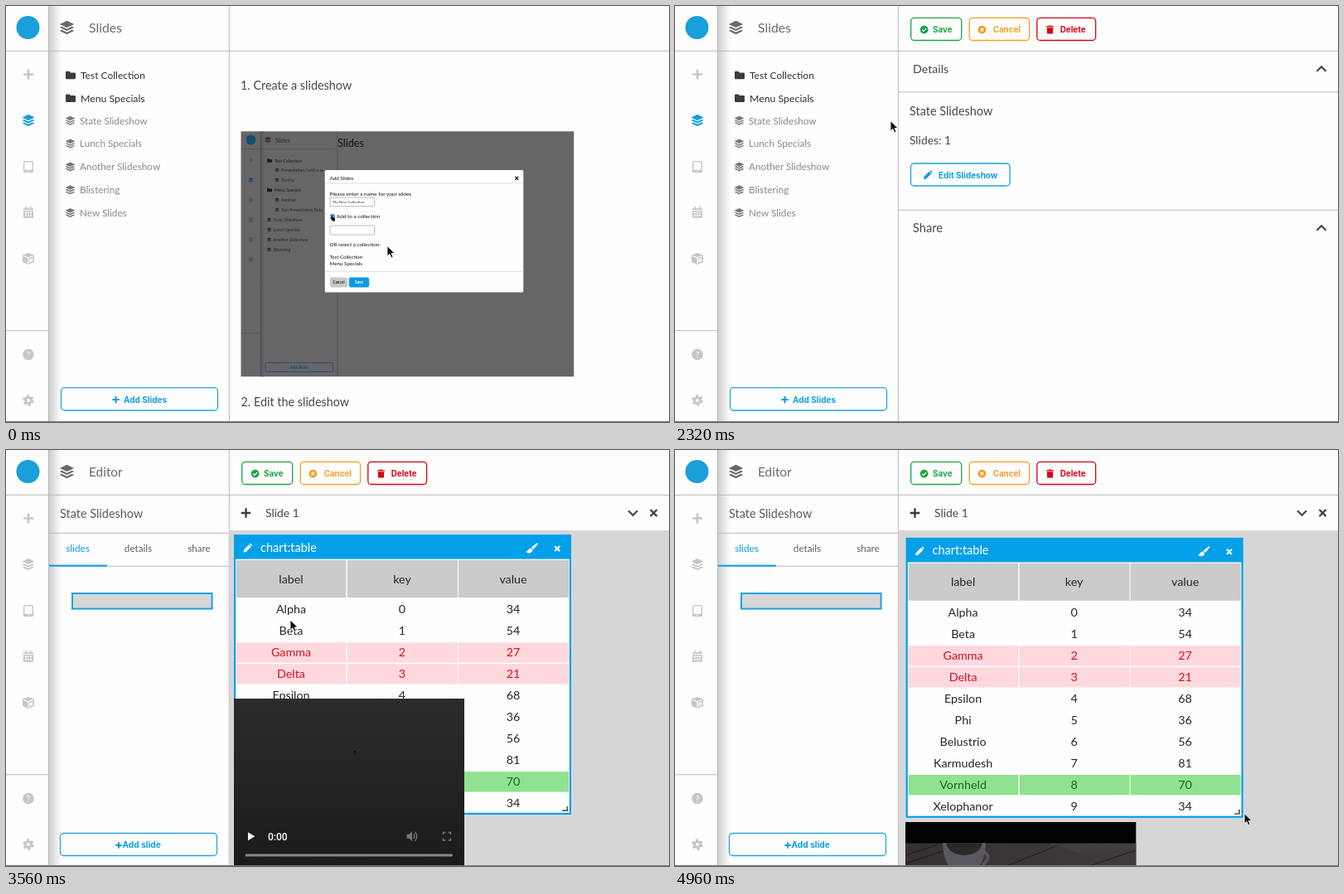
These frames come from a looping animation (800 px wide and 502 px high, 5 s). An HTML page:

```html
<!DOCTYPE html>
<html lang="en">
<head>
<meta charset="utf-8">
<title>Slideshow editor</title>
<style>
html, body { margin: 0; width: 100%; height: 100%; overflow: hidden; background: #fefefe; }
svg { display: block; width: 800px; height: 502px; }
text { font-family: Lato, sans-serif; white-space: pre; }
.b { font-family: Inter, sans-serif; font-weight: 700; }
.hide { display: none; }
.row rect { fill: none; }
.row { color: #888; --icon: #777; }
.row.on { color: #2ba6de; --icon: #2ba6de; }
.row.on rect { fill: #eae9ef; }
#edit { color: #0c9fe3; --bg: #fefefe; }
#edit.on { color: #fff; --bg: #03a0ea; }
</style>
</head>
<body>
<svg id="stage" viewBox="0 0 800 502" xmlns="http://www.w3.org/2000/svg"></svg>
<script>
const LOOP = 5000, BLUE = '#03a0ea', LINE = '#b9b9bd', INK = '#48484a';
const OPEN_DETAILS = 1360, OPEN_EDITOR = 3520, LAYOUT_DONE = 3760;

// Drawing helpers, all return SVG markup.
const text = (x, y, s, size, fill = INK, extra = '') =>
  `<text x="${x}" y="${y}" font-size="${size}" fill="${fill}" ${extra}>${s}</text>`;
const mid = (x, y, s, size, fill) => text(x, y, s, size, fill, 'text-anchor="middle"');
const bold = (x, y, s, size, fill) => text(x, y, s, size, fill, 'class="b"');
const rect = (x, y, w, h, fill, extra = '') =>
  `<rect x="${x}" y="${y}" width="${w}" height="${h}" fill="${fill}" ${extra}/>`;
const path = (d, fill, extra = '') => `<path d="${d}" fill="${fill}" ${extra}/>`;
const stroke = (d, color, w, extra = '') =>
  path(d, 'none', `stroke="${color}" stroke-width="${w}" ${extra}`);
const at = (x, y, body, k = 1) => `<g transform="translate(${x} ${y}) scale(${k})">${body}</g>`;
const group = (id, body) => `<g id="${id}">${body}</g>`;
const frame = (x, y, w, h, color, fill = '#fefefe') =>
  rect(x, y, w, h, fill, `rx="4" stroke="${color}" stroke-width="1.3"`);

// Icons, centred on the given point.
const layers = (x, y, fill, k = 1) => at(x, y, path(
  'M0-8 8.5-4 0 0-8.5-4ZM-8.5 0-6-1.2 0 1.6 6-1.2 8.5 0 0 4ZM-8.5 4-6 2.8 0 5.6 6 2.8 8.5 4 0 8Z', fill), k);
const folder = (x, y, fill, k = 1) => at(x, y, path(
  'M-6-3.5Q-6-4.7-4.8-4.7H-1.6L0-3.1H4.8Q6-3.1 6-2V3.5Q6 4.7 4.8 4.7H-4.8Q-6 4.7-6 3.5Z', fill), k);
const plus = (x, y, r, color, w) => stroke(`M${x - r} ${y}h${2 * r}M${x} ${y - r}v${2 * r}`, color, w);
const cross = (x, y, r, color, w) =>
  stroke(`M${x - r} ${y - r}l${2 * r} ${2 * r}M${x + r} ${y - r}l${-2 * r} ${2 * r}`, color, w);
const chevron = (x, y, h) =>
  stroke(`M${x - 5.5} ${y + h}L${x} ${y - h}L${x + 5.5} ${y + h}`, INK, 2.2);
const pencil = (x, y, fill) => at(x, y, path(
  'M-5 5-4.4 1.8 1.6-4.2 4.2-1.6-1.8 4.4ZM2.3-4.8 3.2-5.5Q4-5.6 5-4.6 5.6-3.8 5.3-3.2L4.8-2.3Z', fill));
const tablet = (x, y, c, k = 1) => at(x, y,
  rect(-6, -7, 12, 14, c, 'rx="1.5"') + rect(-4.6, -5.6, 9.2, 9.4, '#fefefe') + rect(-.8, 4.8, 1.6, 1.2, '#fefefe'), k);
const calendar = (x, y, c, k = 1) => {
  let cells = '';
  for (let i = 0; i < 6; i++) cells += rect(-4.2 + i % 3 * 3.1, -.6 + (i / 3 | 0) * 3.3, 2.1, 2.1, '#fefefe');
  return at(x, y, path('M-6-4.8H-3.6V-7H-2V-4.8H2V-7H3.6V-4.8H6V-2.9H-6ZM-6-2H6V6.8H-6Z', c) + cells, k);
};
const cube = (x, y, c, k = 1) => at(x, y,
  path('M0-7 7-4.4V3.8L0 7-7 3.8V-4.4Z', c) +
  stroke('M-5.6-3.4 0-1.3 5.6-3.4M0-1.3V6', '#fefefe', 1.2) + path('M1.4 .6 5.4-1V2.8L1.4 4.6Z', '#fefefe'), k);
const gear = (x, y, c, k = 1) => at(x, y,
  `<circle r="5.4" fill="none" stroke="${c}" stroke-width="2.6" stroke-dasharray="3.1 2.555"/>` +
  `<circle r="3.4" fill="none" stroke="${c}" stroke-width="2.8"/>`, k);
const disc = (x, y, r, fill) => `<circle cx="${x}" cy="${y}" r="${r}" fill="${fill}"/>`;

function rail() {
  const c = '#c6c6c8';
  return rect(52, 0, 15, 502, 'url(#edge)') + disc(26.5, 26, 14, '#199fd9') +
    stroke('M0 54.3H800M0 391.8H51M51.5 0V502M269.3 0V502', LINE, 1) +
    plus(27, 82.5, 6, c, 2.6) + layers(27, 138, c, .86) +
    group('active', layers(27, 138, '#0c9fe3', .86)) +
    tablet(27, 194, c) + calendar(27, 249, c) + cube(27, 305, c) +
    disc(27, 420.5, 6.8, c) + mid(27, 424.5, '?', 11, '#fefefe') + gear(27, 476, c) +
    layers(73.5, 26, '#69696c', 1.02);
}

const slides = ['State Slideshow', 'Lunch Specials', 'Another Slideshow', 'Blistering', 'New Slides'];

function sidebar() {
  const row = (s, i) => {
    const y = 138.3 + i * 27.8;
    return `<g class="row">${rect(65, y - 13.8, 190, 27.4, '', 'rx="5"')}` +
      layers(77.5, y, 'var(--icon)', .69) + text(89, y + 4.3, s, 11.75, 'currentColor') + '</g>';
  };
  return text(100, 32.3, 'Slides', 15.8, '#6a6a6d') +
    folder(78, 83.5, '#3c3c3e') + text(90, 87.8, 'Test Collection', 12, '#303032') +
    folder(78, 111.2, '#3c3c3e') + text(90, 115.5, 'Menu Specials', 12.3, '#303032') +
    slides.map(row).join('') +
    frame(66.5, 460.7, 189, 27.3, '#25a6dd') + plus(132.5, 475, 4.2, '#0c9fe3', 2) +
    bold(142, 478.7, 'Add Slides', 10, '#0c9fe3');
}

// Small recording shown on the welcome page.
function tutorial() {
  const d = '#2b292b', f = '#1d1b1d';
  const items = [
    [187, 'Test Collection', 0], [198, 'Presentation I with a re', 1], [210, 'Testing', 1],
    [222.5, 'Menu Specials', 0], [234, 'Another', 1], [246, 'Test Presentation Beta', 1],
    [258, 'State Slideshow', 2], [270, 'Lunch Specials', 2], [282, 'Another Slideshow', 2], [294, 'Blistering', 2]
  ];
  const list = items.map(([y, s, kind]) => {
    const x = [324, 332, 322.5][kind];
    return (kind ? layers(x - 5, y, d, .32) : folder(x - 6, y - .5, f, .5)) +
      text(x, y + 1.8, s, 5.05, kind ? d : f);
  }).join('');
  const dim = '#565356';
  return rect(283.5, 151.3, 401.7, 295.9, '#686568') + rect(307, 151.3, 5, 295.9, 'url(#edge2)') +
    stroke('M283.5 172.5H400M307 151.3V447M399.8 151.3V447M283.5 395H307', '#4b494b', .6) +
    disc(295.5, 161.5, 6, '#14506b') + layers(316, 161.5, d, .45) + text(325, 164.5, 'Slides', 7, d) +
    plus(295.5, 186, 2.4, dim, 1.1) + layers(295.5, 210, '#114f6d', .38) +
    [234, 258, 282].map(y => rect(293, y - 2.8, 5, 5.6, dim, 'rx="1"')).join('') + disc(295.5, 306, 2.8, dim) +
    list + rect(313, 430.5, 81.5, 11, 'none', 'rx="2" stroke="#164f69" stroke-width=".8"') +
    bold(339, 437.8, '+ Add Slides', 4.2, '#164f69') + text(400, 170.3, 'Slides', 12.6, '#111') +
    rect(384.7, 198, 239.6, 147.5, '#fefefe', 'rx="1.5"') +
    text(390.5, 210, 'Add Slides', 6.3, '#111') + cross(616.3, 207.8, 1.9, '#111', 1.3) +
    stroke('M385 213.8H624M385 320.3H624', '#d5d5d8', .7) +
    text(390.5, 228.6, 'Please enter a name for your slides', 6.5, '#151515') +
    rect(391, 231, 53.5, 10.7, '#fefefe', 'stroke="#aaa" stroke-width=".8" rx="1"') +
    text(394, 238, 'My New Collection', 4.6, '#444') +
    rect(391.4, 251.2, 5.2, 5.2, '#1384d0', 'rx="1"') + stroke('M392.6 253.8l1.2 1.2 1.9-2.4', '#fff', .8) +
    text(399, 255.8, 'Add to a collection', 6.35, '#151515') +
    rect(391, 265, 53.5, 11, '#fefefe', 'stroke="#aaa" stroke-width=".8" rx="1"') +
    group('focus', rect(391, 265, 53.8, 11.2, '#fefefe', 'stroke="#259fdb" stroke-width="1.5" rx="1"') +
      stroke('M394 267.5v6', '#333', .5)) +
    text(390.5, 290.4, 'OR select a collection:', 6.3, '#151515') +
    text(390.5, 305.4, 'Test Collection', 6.1, '#151515') + text(390.5, 312.8, 'Menu Specials', 6.25, '#151515') +
    rect(391, 327.5, 21.5, 12, '#c9c9c9', 'rx="2.5"') + bold(394.3, 335.2, 'Cancel', 4.2, '#333') +
    rect(413.8, 327.5, 24.4, 12, '#0b9be2', 'rx="2.5"') + bold(421, 335.2, 'Save', 4.2, '#fff') +
    group('mini', '<g id="miniHand">' + path('M-1-3V0L-2.2-.8-2.6 0 0 3.6H3V0L.2-1V-3Z', '#111') + '</g>' +
      '<g id="miniBeam"><circle r="6" fill="#fff" fill-opacity=".7" stroke="#222" stroke-width="1.1"/>' +
      stroke('M-1.2-3.2Q0-3.2 0-2.4V2.4Q0 3.2-1.2 3.2M1.2-3.2Q0-3.2 0-2.4M0 2.4Q0 3.2 1.2 3.2', '#222', .8) + '</g>');
}

const welcome = () => text(283, 101, '1. Create a slideshow', 14.4) + tutorial() +
  text(283.5, 483, '2. Edit the slideshow', 14.4);

function toolbar() {
  const g = '#1fa446', o = '#f0a024', r = '#d8000f';
  return frame(284.7, 14.3, 61, 27.2, g) + disc(300.6, 28.6, 4.9, g) +
    stroke('M298.2 28.7l1.7 1.7 3.2-3.3', '#fefefe', 1.3) + bold(311, 32.3, 'Save', 9.9, g) +
    frame(355.2, 14.3, 72.4, 27.2, o) + disc(370.4, 28.6, 4.9, o) +
    cross(370.4, 28.6, 1.8, '#fefefe', 1.3) + bold(383.7, 32.3, 'Cancel', 9.8, o) +
    frame(436.8, 14.3, 70.8, 27.2, r) +
    path('M448 24.2H450.8L451.3 23.4H453.7L454.2 24.2H457V25.5H448ZM448.7 26.2H456.3L455.9 33.6H449.1Z', r) +
    bold(464.8, 32.3, 'Delete', 9.8, r);
}

const details = () => text(287, 81, 'Details', 14.2) + chevron(780, 76, 2.8) +
  stroke('M270 103.9H800M270 246.2H800', LINE, 1) +
  text(283, 132, 'State Slideshow', 14.45) + text(283, 166.7, 'Slides: 1', 13.8) +
  group('edit', frame(284.5, 190, 119.6, 27, '#1ba3e0', 'var(--bg)') +
    pencil(305, 204, 'currentColor') + bold(318, 207.7, 'Edit Slideshow', 9.95, 'currentColor')) +
  text(287, 273, 'Share', 14.6) + chevron(780, 268, 2.8);

function table() {
  const rows = [['Alpha', 34], ['Beta', 54], ['Gamma', 27], ['Delta', 21], ['Epsilon', 68], ['Phi', 36],
    ['Belustrio', 56], ['Karmudesh', 81], ['Vornheld', 70], ['Xelophanor', 34]];
  const cols = [[278, 344], [412, 478], [546, 612]];
  const line = (cells, y, top, h, bg, ink) => cols.map(([x, c], i) =>
    (bg ? rect(x, top, i ? 133 : 132.5, h, bg) : '') + mid(c, y, cells[i], 14.3, ink)).join('');
  const body = rows.map(([name, v], i) => {
    const y = 192.2 + 26 * i, low = v < 30, high = v === 70;
    return line([name, i, v], y + 5, y - 12, 24.4, low ? '#ffd8de' : high ? '#90e290' : '',
      low ? '#d3101c' : high ? '#15691c' : '#262628');
  }).join('');
  const brush = path('M7-6.2Q7.6-5.6 6.8-4.6L1.8 1.2-.8-1 5.6-6.2Q6.4-6.8 7-6.2ZM-1.4-.4 1 1.8Q.6 5.4-3.4 5.6-6 5.6-7 3.6-5 3.8-4.4 2-3.6-.2-1.4-.4Z', '#fff');
  return rect(275, 102, 407, 338, BLUE) + rect(277.2, 131.6, 402.6, 306.2, '#fefefe') +
    pencil(291.5, 118.5, '#fff') + text(307, 122.6, 'chart:table', 14.5, '#fff') +
    at(634.5, 118.8, brush) + cross(665.2, 119, 3, '#fff', 2.1) +
    line(['label', 'key', 'value'], 160.5, 133, 45, '#cbcbcb', '#262628') + body +
    stroke('M671.5 435.2H677.3V430', '#555', 1.7);
}

const loadingVideo = () => rect(275, 300, 278, 202, 'url(#player)') + rect(420, 363, 1.8, 2.4, '#0d0d0e') +
  path('M292 461.2 300.3 466.2 292 471.2Z', '#fff') +
  text(316, 470.5, '0:00', 12, '#fff', 'style="font-family:Roboto,sans-serif;font-weight:500"') +
  path('M483.5 463.7H486.5L490 460.2V472.2L486.5 468.7H483.5Z', '#757477') +
  stroke('M492 463.3Q494 466.2 492 469.1M493.6 460.7Q498 466.2 493.6 471.7', '#757477', 1.4) +
  stroke('M527.5 464V461.5H530.5M533.5 461.5H536.5V464M536.5 468.5V471H533.5M530.5 471H527.5V468.5', '#757477', 1.5) +
  rect(288.5, 487.6, 250.5, 3, '#89888a', 'rx="1.5"');

const photo = () => '<g clip-path="url(#photoBox)">' + rect(278, 449, 278.5, 53, '#020202') +
  rect(278, 474.5, 278.5, 28, 'url(#wood)') +
  stroke('M278 489 318 476M278 499 330 482M400 502 470 474M500 502 556 483', '#231f20', 1.2) +
  path('M452 475H556V481L490 487Z', '#4a4244', 'opacity=".5"') +
  stroke('M372 485Q384 490 371 501', '#55545b', 4) +
  path('M323 474H375Q375 492 366 504H332Q323 492 323 474Z', '#5a5960') +
  path('M327 474H371Q368 488 349 489 330 488 327 474Z', '#2c2829') + '</g>';

const editor = () => text(100, 32.3, 'Editor', 15.4, '#6a6a6d') + text(65, 82.4, 'State Slideshow', 14.45, '#5a5a5d') +
  stroke('M52 100.3H269M52 140.2H269', LINE, 1) + rect(52, 138.6, 70, 2, '#0c9fe3') +
  mid(86.5, 123.3, 'slides', 11.8, '#0c9fe3') + mid(159.5, 123.3, 'details', 11.7, '#5f5f62') +
  mid(233, 123.3, 'share', 11.7, '#5f5f62') +
  rect(80, 173, 168.6, 18.6, '#d6d6d8', `stroke="#1ba3e0" stroke-width="2"`) +
  frame(65.5, 462.5, 189, 27, '#25a6dd') + plus(136, 477, 3.7, '#0c9fe3', 1.9) +
  bold(140.5, 480.4, 'Add slide', 10.2, '#0c9fe3') +
  plus(289.5, 76, 5.8, '#3c3c3e', 2.3) + text(313, 81, 'Slide 1', 13.9) +
  chevron(756.5, 76, -2.8) + cross(781.5, 76, 4, '#3c3c3e', 2.3) +
  rect(269.8, 97, 531, 405, '#d6d6d8') +
  '<g clip-path="url(#canvas)">' + group('photo', photo()) +
  group('shadow', rect(281, 112, 403, 333, '#000', 'filter="url(#blur)"')) +
  group('table', table()) + group('loading', loadingVideo()) + '</g>';

const arrow = path('M0 0V12.4L2.9 9.8 4.9 14.4 7 13.5 5.1 9H9Z', '#0a0a0a', 'stroke="#fff" stroke-width=".9"');
const hand = path('M-1.3 1Q-1.3-.6 0-.6T1.3 1V4.6Q2.2 3.9 3.1 4.9 4.2 4.3 5 5.5 6.7 5 6.8 7V9.4Q6.8 11.6 5.7 13.6H-.6Q-1.5 11.4-4.2 8.6-4.8 7.4-3.6 7-2.5 6.9-1.3 8.2Z',
  '#fff', 'stroke="#111" stroke-width="1.1"') + stroke('M1.2 8.6V11.4M3 8.6V11.4M4.8 8.6V11.4', '#111', .8);

const fade = (id, box, a, b) => `<linearGradient id="${id}" ${box}><stop stop-color="${a}"/><stop offset="1" stop-color="${b}"/></linearGradient>`;
const down = 'x1="0" x2="0" y1="0" y2="1"';

document.getElementById('stage').innerHTML = '<defs>' +
  fade('edge', '', '#cfcfd1', '#fefefe') + fade('edge2', '', '#565356', '#686568') +
  fade('player', down, '#2b2a2c', '#1b1a1c') + fade('wood', '', '#353033', '#403a3c') +
  '<clipPath id="canvas"><path d="M270 97H800V502H270Z"/></clipPath>' +
  '<clipPath id="photoBox"><path d="M278 449H556.5V502H278Z"/></clipPath>' +
  '<filter id="blur" x="-20%" y="-20%" width="140%" height="140%"><feGaussianBlur stdDeviation="8"/></filter></defs>' +
  rect(0, 0, 800, 502, '#fefefe') + rail() + group('sidebar', sidebar()) + group('welcome', welcome()) +
  group('toolbar', toolbar()) + group('details', details()) + group('editor', editor()) +
  rect(0, 501, 800, 1, '#77777a') +
  group('cursor', group('arrow', arrow) + group('hand', hand));

const el = {};
document.querySelectorAll('[id]').forEach(e => el[e.id] = e);
const rowEls = [...document.querySelectorAll('.row')];

// Pointer stops: time, x, y.
const pointerStops = [[120, 460, 289.5], [720, 172, 140.5], [1700, 172, 140.5], [2320, 260, 138.5],
  [2960, 343, 205], [3860, 343, 205], [4360, 691, 380], [4760, 687, 438.5]];
const miniStops = [[160, 394, 256], [640, 403, 272.8]];

function position(stops, t) {
  const i = stops.findIndex(s => s[0] > t);
  if (i === 0) return stops[0].slice(1);
  if (i < 0) return stops[stops.length - 1].slice(1);
  const [t0, x0, y0] = stops[i - 1], [t1, x1, y1] = stops[i];
  let k = (t - t0) / (t1 - t0);
  k *= k * (3 - 2 * k);
  return [x0 + (x1 - x0) * k, y0 + (y1 - y0) * k];
}

const ramp = (t, a, b) => Math.min(1, Math.max(0, (t - a) / (b - a)));
const show = (id, on) => el[id].classList.toggle('hide', !on);
const move = (id, x, y) => el[id].setAttribute('transform', `translate(${x} ${y})`);

function render(t) {
  const inEditor = t >= OPEN_EDITOR, inDetails = t >= OPEN_DETAILS && !inEditor;
  const ready = t >= LAYOUT_DONE;
  show('welcome', t < OPEN_DETAILS);
  show('sidebar', !inEditor);
  show('active', !inEditor);
  show('toolbar', t >= OPEN_DETAILS);
  show('details', inDetails);
  show('editor', inEditor);

  const [x, y] = position(pointerStops, t);
  move('cursor', x, y);
  const over = !inEditor && x > 65 && x < 255 ? Math.floor((y - 124.5) / 27.8) : -1;
  rowEls.forEach((r, i) => r.classList.toggle('on', i === over));
  const onRow = over >= 0 && over < rowEls.length;
  show('hand', onRow);
  show('arrow', !onRow);
  el.edit.classList.toggle('on', x > 284 && x < 404 && y > 190 && y < 217);

  move('mini', ...position(miniStops, t));
  show('miniHand', t < 600);
  show('miniBeam', t >= 600);
  show('focus', t >= 720);

  move('table', ready ? 3.6 : 0, ready ? 3.8 : 0);
  show('loading', !ready);
  show('photo', ready);
  el.shadow.setAttribute('opacity', .55 * ramp(t, LAYOUT_DONE, 4000) * (1 - ramp(t, 4340, 4640)));
}

const start = performance.now();
function tick() {
  render((performance.now() - start) % LOOP);
  requestAnimationFrame(tick);
}
tick();
</script>
</body>
</html>
```
